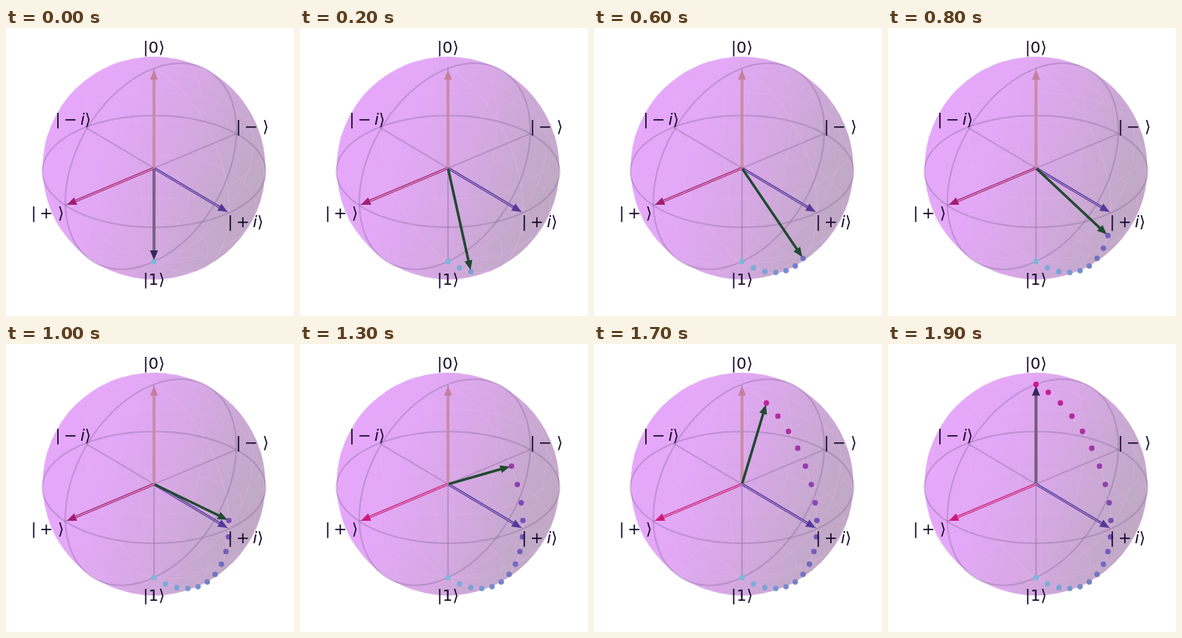
Write an HTML page that moves like this. It is 360 by 360 pixels and loops after 2 s.

```html
<!DOCTYPE html>
<html lang="en">
<head>
<meta charset="utf-8">
<title>Bloch sphere rotation</title>
<style>
  html, body { margin: 0; width: 100%; height: 100%; overflow: hidden; background: #fff; }
  svg { display: block; width: 100vw; height: 100vh; }
  text { font: 20px "DejaVu Sans", sans-serif; fill: #140a2a; text-anchor: middle; }
  .i { font-style: italic; }
  .mesh { fill: none; stroke: #e6b4f2; stroke-opacity: .3; stroke-width: 1; }
  .frame { fill: none; stroke: #826496; stroke-opacity: .36; stroke-width: 1.9; }
</style>
</head>
<body>
<svg viewBox="0 0 360 360">
  <defs>
    <linearGradient id="shade" gradientUnits="userSpaceOnUse" x1="60" y1="135" x2="315" y2="225">
      <stop offset="0" stop-color="#e6a7fa"/>
      <stop offset=".22" stop-color="#e4a8f8"/>
      <stop offset=".55" stop-color="#d7a8e5"/>
      <stop offset=".85" stop-color="#c5a9cc"/>
      <stop offset="1" stop-color="#c0a9c5"/>
    </linearGradient>
  </defs>
  <circle cx="185" cy="175" r="139.2" fill="url(#shade)"/>
  <g id="grid"></g>
  <g id="arrows"></g>
  <g>
    <text x="185" y="31">|0⟩</text>
    <text x="185" y="320.5">|1⟩</text>
    <text x="84" y="121">|&#8201;−&#8201;<tspan class="i">i</tspan>⟩</text>
    <text x="52" y="238">|&#8201;+&#8201;&#8202;⟩</text>
    <text x="308" y="130">|&#8201;−&#8201;&#8202;⟩</text>
    <text x="299.5" y="249">|&#8201;+&#8201;<tspan class="i">i</tspan>⟩</text>
  </g>
</svg>
<script>
const STEPS = 20, STEP_MS = 100, RADIUS = 139.3, EYE = 15;
const CENTER = [185, 175.2];
const { sin, cos, PI } = Math;
const AZIM = 40 * PI / 180, ELEV = PI / 6;
const grid = document.getElementById('grid');
const arrows = document.getElementById('arrows');

// Perspective view of a point given in Bloch coordinates.
function project(x, y, z) {
  const right = y * sin(AZIM) - x * cos(AZIM);
  const front = x * sin(AZIM) + y * cos(AZIM);
  const depth = front * cos(ELEV) + z * sin(ELEV);
  const scale = RADIUS * EYE / (EYE - depth);
  return [CENTER[0] + right * scale,
          CENTER[1] + (front * sin(ELEV) - z * cos(ELEV)) * scale];
}

function curve(pointAt, from, to, className) {
  const points = Array.from({ length: 73 }, (_, i) =>
    project(...pointAt(from + (to - from) * i / 72)).map(v => v.toFixed(2)));
  return `<polyline class="${className}" points="${points.join(' ')}"/>`;
}

function drawGrid() {
  const angles = [0, 37.5, 75, 112.5, 150, 180].map(a => a * PI / 180);
  let out = '';
  for (const a of angles) {
    for (const side of [1, -1]) {
      out += curve(v => [-side * sin(a) * sin(v), cos(a) * sin(v), cos(v)], 0, PI, 'mesh');
    }
    out += curve(u => [sin(a) * cos(u), sin(a) * sin(u), cos(a)], 0, 2 * PI, 'mesh');
  }
  out += curve(a => [cos(a), sin(a), 0], 0, 2 * PI, 'frame');
  out += curve(a => [cos(a), 0, sin(a)], 0, 2 * PI, 'frame');
  out += curve(s => [s, 0, 0], -1, 1, 'frame');
  out += curve(s => [0, s, 0], -1, 1, 'frame');
  out += curve(s => [0, 0, s], -1, 1, 'frame');
  grid.innerHTML = out;
}

function arrow(end, color, core, head = color) {
  const [cx, cy] = CENTER;
  const angle = Math.atan2(end[1] - cy, end[0] - cx) * 180 / PI;
  const tip = Math.hypot(end[0] - cx, end[1] - cy) - 2;
  const shaft = (stroke, width) =>
    `<path d="M1 0H${tip - 8}" stroke="${stroke}" stroke-width="${width}"/>`;
  return `<g transform="translate(${cx} ${cy}) rotate(${angle})">
    ${shaft(color, 3.2)}${core ? shaft(core, 1.2) : ''}
    <path d="M${tip} 0l-12 -5v10z" fill="${head}"/></g>`;
}

function dotColor(i) {
  const blue = [125, 184, 218], violet = [110, 84, 184], pink = [210, 22, 152];
  const [a, b, f] = i < 9 ? [blue, violet, i / 9] : [violet, pink, (i - 9) / 10];
  return `rgb(${a.map((v, n) => Math.round(v + (b[n] - v) * f))})`;
}

function statePoint(i) {
  const a = PI * i / (STEPS - 1);
  return project(0, sin(a), -cos(a));
}

function draw(step) {
  const atPole = step === 0 || step === STEPS - 1;
  let out = arrow(project(0, 0, 1), '#c47f9c', '#cd94a8');
  out += arrow(project(1, 0, 0), step < 12 ? '#a02072' : '#cc1a7c', '#d98cc4');
  out += arrow(project(0, 1, 0), '#56389a', '#a688cc');
  for (let i = 0; i <= step; i++) {
    const [x, y] = statePoint(i);
    out += `<circle cx="${x}" cy="${y}" r="3.4" fill="${dotColor(i)}"/>`;
  }
  out += atPole ? arrow(statePoint(step), '#55416a', '#8c7890', '#35285c')
                : arrow(statePoint(step), '#20492f');
  arrows.innerHTML = out;
}

let shown = -1;
function tick() {
  const step = Math.floor(performance.now() / STEP_MS) % STEPS;
  if (step !== shown) draw(shown = step);
  requestAnimationFrame(tick);
}
drawGrid();
tick();
</script>
</body>
</html>
```
